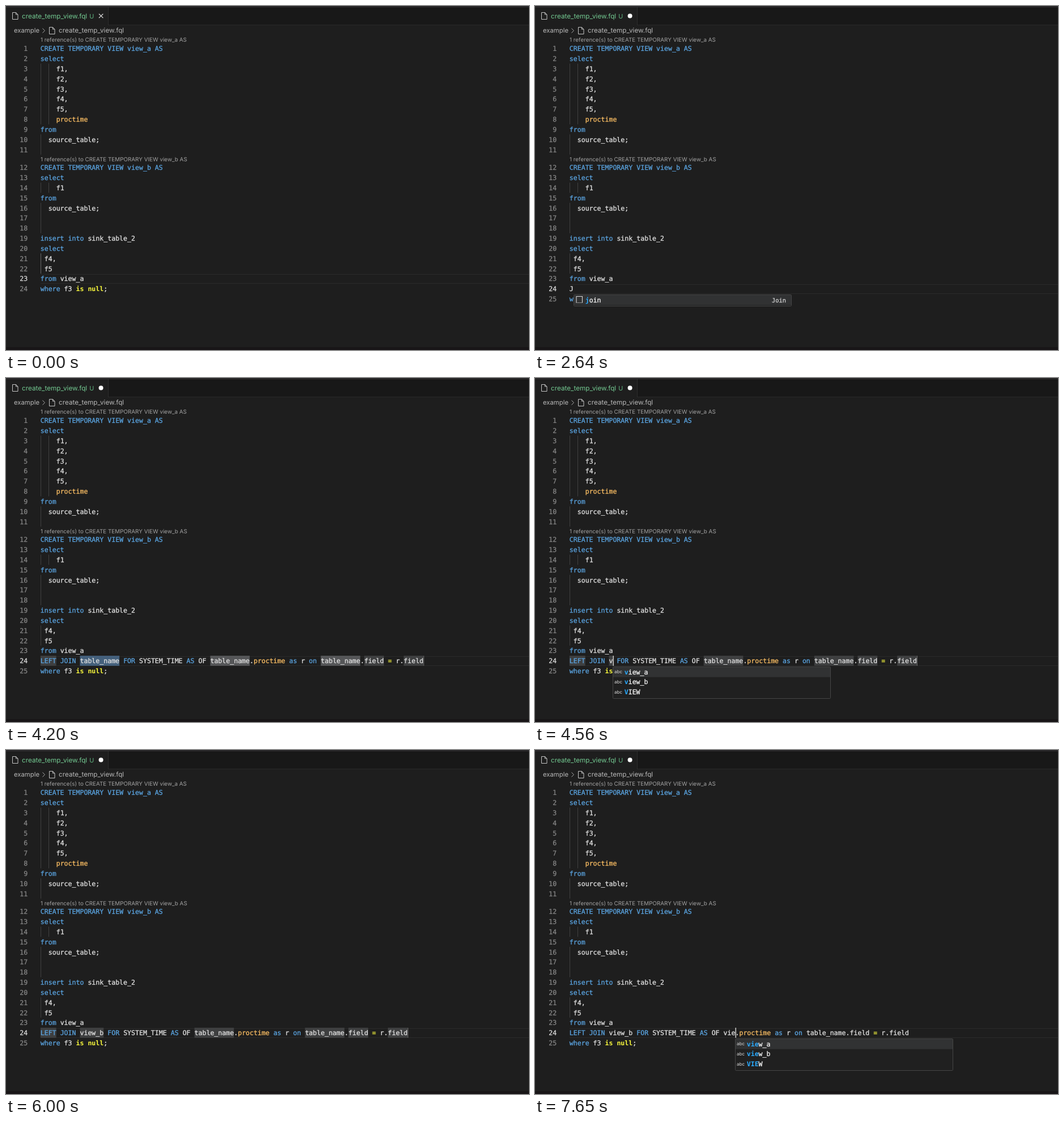
Animation, 923 px wide and 607 px high, one loop 8000 ms. Source, as an HTML page:

```html
<!DOCTYPE html>
<html lang="en">
<head>
<meta charset="utf-8">
<title>Editor completion</title>
<style>
html, body { margin: 0; width: 100%; height: 100%; overflow: hidden; background: #1e1e1e; }
svg { display: block; width: 100vw; height: 100vh; }
text { fill: currentColor; text-rendering: geometricPrecision; }
.code { font: 11.575px "DejaVu Sans Mono", monospace; stroke: currentColor; stroke-width: .3px; }
.bold { font-weight: bold; stroke-width: 0; }
.detail { font-size: 10.4px; }
.ui { font-family: Inter, "Liberation Sans", sans-serif; }
</style>
</head>
<body>
<svg id="stage" viewBox="0 0 923 607" preserveAspectRatio="none"></svg>
<script>
const LOOP = 8000, LEFT = 60.8, CHAR = 6.968, ROW = 17.83;
const BLUE = '#5aa3df', WHITE = '#e0e0e0', ORANGE = '#f9bd63', YELLOW = '#f8f83c', MATCH = '#2aaaff';
const KEYWORDS = /^(select|from|insert|into|where|LEFT|JOIN|FOR|AS|as|on)$/;

const HEAD = `CREATE TEMPORARY VIEW view_a AS
select
    f1,
    f2,
    f3,
    f4,
    f5,
    proctime
from
  source_table;

CREATE TEMPORARY VIEW view_b AS
select
    f1
from
  source_table;


insert into sink_table_2
select
 f4,
 f5
from view_a`.split('\n');
const WHERE = 'where f3 is null;';

// Square brackets mark the snippet's placeholders.
const join = (a, b) => `[LEFT] JOIN [${a}] FOR SYSTEM_TIME AS OF [${b}].proctime as r on [table_name].[field] = r.[field]`;
const T = 'table_name';

const popup = (col, rows, icon, match, sel = 0, detail = '') => ({ col, rows, icon, match, sel, detail });
const views = (col, typed, sel) => popup(col, ['view_a', 'view_b', 'VIEW'], 'abc', typed, sel);

// [time, changes to the state]
const STEPS = [
  [0, { line: null, col: 11, caret: false, pop: null, pick: -1, twins: false, marks: true }],
  [1080, { caret: true }],
  [1440, { line: '', col: 0 }],
  [1890, { caret: false }],
  [2190, { line: 'J', col: 1, caret: true }],
  [2220, { pop: popup(1, ['join'], 'box', 'j', 0, 'Join') }],
  [2640, { caret: false }],
  [2880, { line: join(T, T), col: 4, caret: true, pick: 0, pop: null }],
  [2940, { pop: popup(4, ['LEFT', 'RIGHT', 'INNER'], 'enum', 'LEFT') }],
  [3330, { caret: false }],
  [3750, { col: 20, caret: true, pick: 1, pop: null }],
  [3810, { twins: true }],
  [4200, { caret: false }],
  [4530, { line: join('v', T), col: 11, caret: true, pick: -1, twins: false }],
  [4560, { pop: views(11, 'v') }],
  [4590, { line: join('vi', T), col: 12 }],
  [4620, { pop: views(12, 'vi') }],
  [4710, { line: join('vie', T), col: 13 }],
  [4740, { pop: views(13, 'vie') }],
  [5190, { caret: false, pop: views(13, 'vie', 1) }],
  [5370, { line: join('view_b', T), col: 16, caret: true, pop: null }],
  [5820, { caret: false }],
  [6270, { caret: true }],
  [6720, { caret: false }],
  [6900, { col: 49, caret: true, pick: 2 }],
  [6990, { twins: true }],
  [7380, { line: join('view_b', 'v'), col: 40, pick: -1, twins: false }],
  [7410, { pop: views(40, 'v') }],
  [7590, { line: join('view_b', 'vi'), col: 41, pop: views(41, 'vi') }],
  [7650, { line: join('view_b', 'vie'), col: 42, pop: views(42, 'vie'), marks: false }]
];
let state = {};
const STATES = STEPS.map(([time, change]) => ({ time, ...(state = { ...state, ...change }) }));

const xOf = col => LEFT + col * CHAR;
const yOf = n => n < 12 ? 75 + (n - 1) * ROW : 285 + (n - 12) * ROW;
const rect = (x, y, w, h, fill, more = '') => `<rect x="${x}" y="${y}" width="${w}" height="${h}" fill="${fill}" ${more}/>`;
const path = (d, stroke, width = 1) => `<path d="${d}" fill="none" stroke="${stroke}" stroke-width="${width}"/>`;
const mono = (x, y, s, color, cls = '', anchor = 'start') =>
  `<text class="code ${cls}" x="${x}" y="${y + 4.2}" color="${color}" text-anchor="${anchor}">${s}</text>`;
const ui = (x, y, s, color, size) => `<text class="ui" x="${x}" y="${y}" color="${color}" font-size="${size}">${s}</text>`;

function colorOf(word, line) {
  if (line.startsWith('CREATE') || KEYWORDS.test(word)) return BLUE;
  if (word === 'proctime') return ORANGE;
  return /^(is|null|=)$/.test(word) ? YELLOW : WHITE;
}

function codeLine(n, line, active) {
  const y = yOf(n);
  let out = mono(38.3, y, n, active ? '#d8d8d8' : '#858585', '', 'end');
  for (const m of line.matchAll(/\w+|[^\w\s]+/g)) {
    const color = colorOf(m[0], line);
    out += mono(xOf(m.index), y, m[0], color, color === YELLOW ? 'bold' : '');
  }
  return out;
}

function guide(col, from, to, color = '#404040') {
  return rect(Math.round(xOf(col)), yOf(from) - 9, 1, yOf(to) - yOf(from) + 18, color);
}

function fileIcon(x, y) {
  return path(`M${x + .5} ${y + .5}h6l3.5 3.5v8.5h-9.5zM${x + 6.5} ${y + .5}v3.5h3.5`, '#c5c5c5');
}

function placeholders(s, y) {
  let out = '', shift = 0, i = 0;
  for (const m of s.line.matchAll(/\[(\w+)\]/g)) {
    const twin = s.twins && m[1] === T;
    const fill = i === s.pick ? '#44607c' : twin ? '#555658' : '#3e3f40';
    out += rect(xOf(m.index - shift), y - 8.9, m[1].length * CHAR, ROW, fill);
    shift += 2;
    i++;
  }
  const end = s.line.length - shift;
  return i ? out + rect(xOf(end), y - 8.9, 1, ROW, '#6a6a6a') : '';
}

function icon(kind, x, y, selected) {
  if (kind === 'abc') return ui(x + 3, y + 2.8, 'abc', '#d8d8d8', 8);
  if (kind === 'box')
    return path(`M${x + 5} ${y + 5}v-10.5h10.5v10.5`, '#d8d8d8', 1.1) +
      `<path d="M${x + 4.5} ${y + 5.5}h11.5" stroke="#d8d8d8" stroke-width="1.2" stroke-dasharray="1.3 1.2"/>`;
  const c = selected ? '#d0d0d0' : '#dc9430';
  return path(`M${x + 8.5} ${y - 1.5}v-3.5h7v6h-3.5M${x + 10.5} ${y - 3}h3.5M${x + 12} ${y - .5}h2`, c) +
    path(`M${x + 4.5} ${y - .5}h7v5.5h-7zM${x + 6} ${y + 1.3}h4M${x + 6} ${y + 3.2}h4`, c);
}

function label(x, y, word, match) {
  let at = word.toLowerCase().indexOf(match.toLowerCase()), len = match.length;
  if (word === 'RIGHT') [at, len] = [4, 1];
  return [...word].map((c, i) => {
    const hit = at >= 0 && i >= at && i < at + len;
    return mono(x + i * CHAR, y, c, hit ? MATCH : '#f4f4f4', hit ? 'bold' : '');
  }).join('');
}

function popupBox(p) {
  const x = Math.round(xOf(p.col)) + .5, top = 509.5;
  let out = rect(x, top, 384, Math.round(p.rows.length * ROW + 2.5), '#202020', 'stroke="#454545" rx="1"');
  p.rows.forEach((word, i) => {
    const y = 518.4 + i * ROW, on = i === p.sel;
    if (on) out += rect(x + .5, y - 8.4, 383, ROW, '#313233');
    out += icon(p.icon, Math.floor(x), Math.round(y), on) + label(x + 20.2, y, word, p.match);
  });
  if (p.detail) out += mono(x + 374.5, 518.4, p.detail, '#d0d0d0', 'detail', 'end');
  return out;
}

function frame(s) {
  const dirty = s.line !== null, active = dirty ? 24 : 23, y = yOf(active);
  const plain = dirty ? s.line.replace(/[[\]]/g, '') : '';
  const name = 'create_temp_view.fql';
  let out = rect(0, 0, 923, 607, '#1e1e1e') +
    rect(181, 2, 742, 31, '#181818') + rect(181, 33, 742, 1, '#292929') + rect(180, 2, 1, 32, '#2d2d2d') +
    rect(0, 0, 923, 1, '#1a191b') + rect(0, 1, 923, 1, '#3a393b') + rect(0, 602, 923, 5, '#181517');

  out += fileIcon(11, 11) + ui(28, 22, name, '#73c991', 11.75) + ui(147.3, 21.8, 'U', '#62b883', 10.8);
  out += dirty ? '<circle cx="167.6" cy="17.5" r="4" fill="#fff"/>'
    : path('M164 13.8l7.4 7.4M171.4 13.8l-7.4 7.4', '#e8e8e8', 1.2);
  out += ui(14, 47.3, 'example', '#b8b8b8', 11.3) + path('M64.5 39.5l4 4l-4 4', '#a8a8a8') +
    fileIcon(76, 37) + ui(93, 47.3, name, '#b8b8b8', 11.75);
  out += ['a', 'b'].map((v, i) =>
    ui(61, i ? 273.8 : 63, `1 reference(s) to CREATE TEMPORARY VIEW view_${v} AS`, '#a2a2a2', 9.85)).join('');

  out += rect(61, Math.round(y - 8.2), 862, 1, '#2a2a2a') + rect(61, Math.round(y + 8), 862, 1, '#2a2a2a');
  out += guide(0, 3, 8) + guide(2, 3, 8) + guide(0, 10, 11) + guide(0, 14, 14) + guide(2, 14, 14) +
    guide(0, 16, 18) + guide(0, 21, 22, dirty ? '#404040' : '#686868');

  if (dirty && s.marks) out += placeholders(s, y);
  const lines = [...HEAD, ...(dirty ? [plain] : []), WHERE];
  out += lines.map((line, i) => codeLine(i + 1, line, i + 1 === active)).join('');
  if (s.pop) out += popupBox(s.pop);
  if (s.caret) out += rect(xOf(s.col), y - 8.9, 1.6, ROW, '#c8c8c6');
  return out;
}

const stage = document.getElementById('stage');
let shown;
function tick() {
  const t = performance.now() % LOOP;
  const next = STATES.findLast(s => s.time <= t);
  if (next !== shown) stage.innerHTML = frame(shown = next);
  requestAnimationFrame(tick);
}
tick();
</script>
</body>
</html>
```
